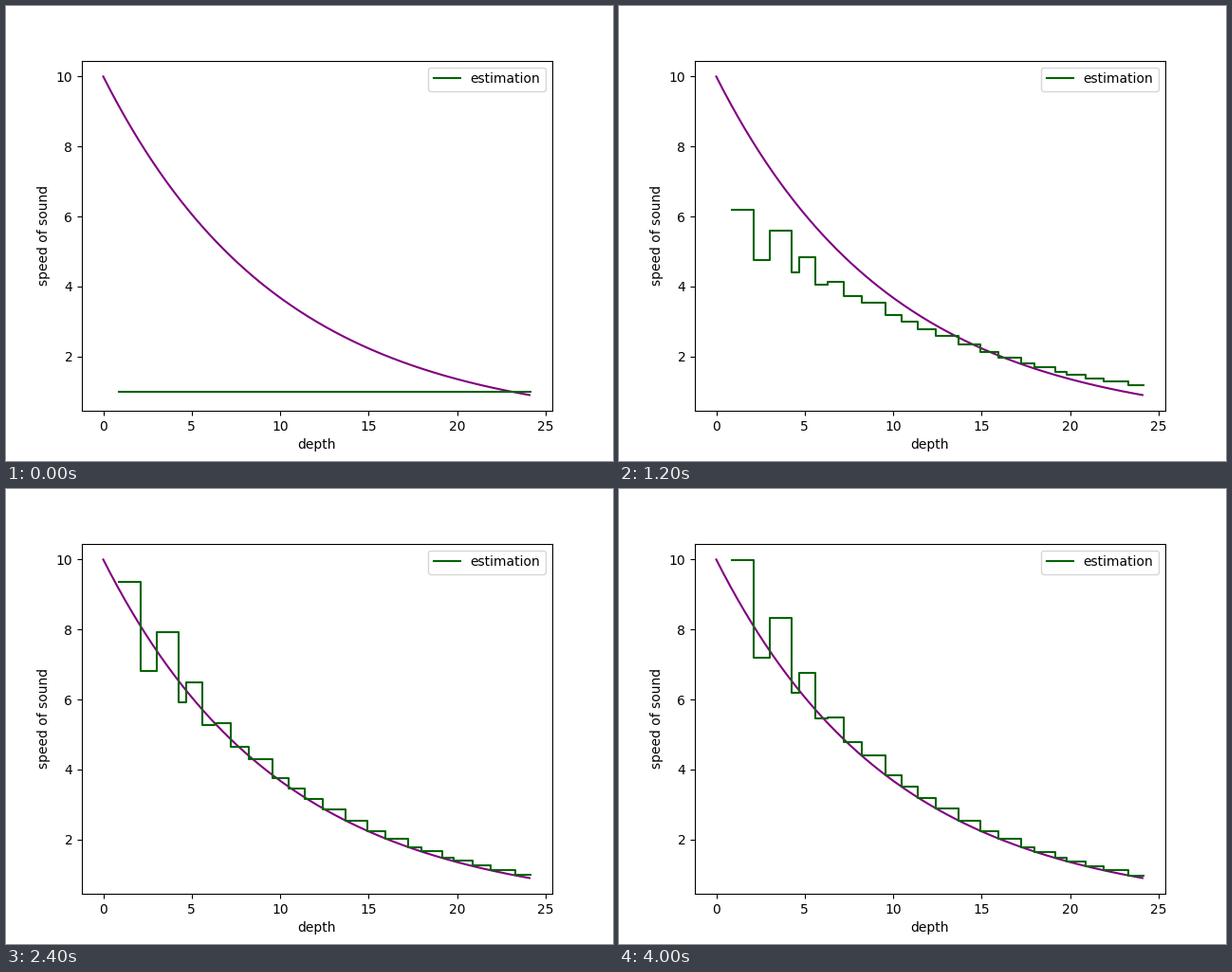
A matplotlib script for the animation above (4400 ms loop, 640 by 480 pixels).

```python
import matplotlib.pyplot as plt
import numpy as np
from matplotlib.animation import FuncAnimation

FRAMES, INTERVAL = 11, 400

# Irregular layer boundaries along the depth axis
edges = np.array([0.9, 2.12, 3.03, 4.27, 4.7, 5.6, 6.3, 7.2, 8.25, 9.55, 10.5, 11.4,
                  12.4, 13.7, 14.95, 15.97, 17.25, 18, 19.15, 19.8, 20.9, 21.9,
                  23.3, 24.18])
tops = edges[:-1]
layer = np.arange(len(tops))


def sound_speed(depth):
    return 10 * np.exp(-depth / 10)


def settled_speed():
    """True speed plus an alternating error that fades with depth."""
    error = 0.13 * np.exp(-((layer - 2) / 3.5) ** 2) * np.minimum(1, np.diff(edges))
    return sound_speed(tops) * (1 + (-1.0) ** layer * error)


def estimate(n):
    """Layer speeds after n iterations, starting from 1 everywhere."""
    delay = 3.4 - 0.12 * tops
    power = 1.65 - 0.035 * tops
    progress = 1 - np.exp(-(n / delay) ** power)
    overshoot = 1.5 * (tops / 24) ** 3 * n * np.exp(-n)
    speed = 1 + (settled_speed() - 1) * progress + overshoot
    return np.minimum(speed, 2.0 ** n)  # at most doubling per iteration


fig, ax = plt.subplots(figsize=(6.4, 4.8), dpi=100)
depth = np.arange(242) / 10
ax.plot(depth, sound_speed(depth), color="purple")
steps, = ax.plot(np.repeat(edges, 2)[1:-1], np.repeat(estimate(0), 2),
                 color="darkgreen", label="estimation")
ax.set_xlabel("depth")
ax.set_ylabel("speed of sound")
ax.legend(loc="upper right")


def update(n):
    steps.set_ydata(np.repeat(estimate(n), 2))
    return steps,


anim = FuncAnimation(fig, update, frames=FRAMES, interval=INTERVAL,
                     repeat=True, repeat_delay=0)
plt.show()
```
